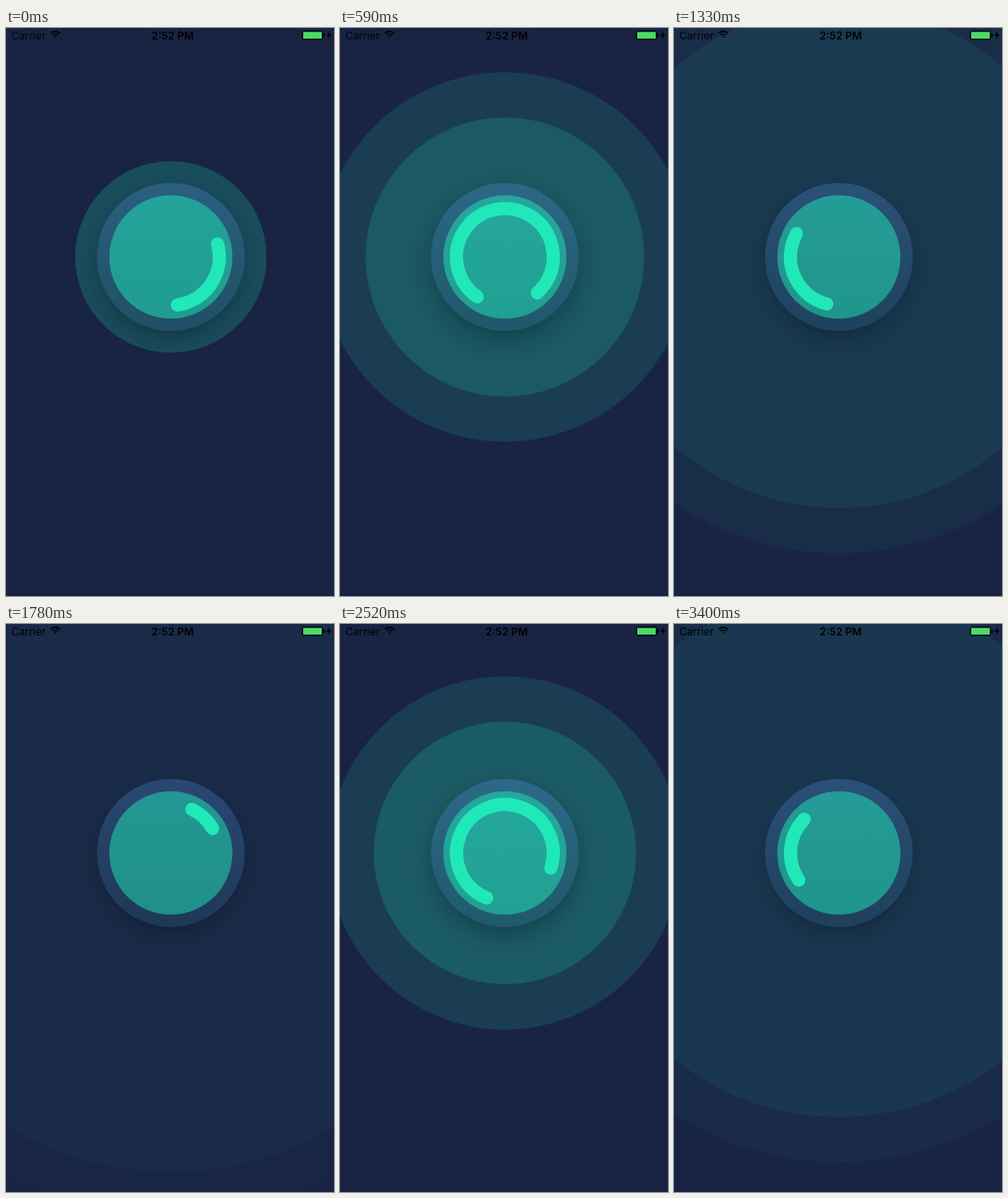
Animation of 373 by 645 pixels, one loop 3.5 s. Source, as an HTML page with a canvas:

```html
<!DOCTYPE html>
<html lang="en">
<head>
<meta charset="utf-8">
<title>Pulsing button</title>
<style>
  html, body { margin: 0; width: 100%; height: 100%; overflow: hidden; background: #192444; }
  canvas { display: block; }
</style>
</head>
<body>
<canvas id="stage" width="373" height="645"></canvas>
<script>
const ctx = document.getElementById('stage').getContext('2d');
const CX = 187.5, CY = 260, KNOB = 84, DISC = 70;
const MINT = '33,232,184';
const LOOP = 3500, CYCLE = 1984, SPIN_START = -312;
const WAVE_START = SPIN_START + 167, WAVE_LIFE = 2000, WAVE_DELAY = 300;
// The picture is held between these moments (ms).
const STEPS = [0, 140, 290, 440, 590, 740, 890, 1030, 1180, 1330, 1480, 1630, 1780,
  1930, 2080, 2220, 2370, 2520, 2670, 2820, 2960, 3110, 3260, 3400];

function circle(r, fill, y = CY) {
  ctx.beginPath();
  ctx.arc(CX, y, r, 0, 2 * Math.PI);
  ctx.fillStyle = fill;
  ctx.fill();
}

function gradient(g, stops) {
  for (const [at, color] of stops) g.addColorStop(at, color);
  return g;
}

const shadow = gradient(ctx.createRadialGradient(CX, CY + 10, 74, CX, CY + 10, 108), [
  [0, 'rgba(0,10,25,.25)'], [.3, 'rgba(0,10,25,.13)'], [.62, 'rgba(0,10,25,.05)'], [1, 'rgba(0,10,25,0)']
]);
const rim = gradient(ctx.createLinearGradient(0, CY - KNOB, 0, CY + KNOB), [
  [0, 'rgba(82,138,213,.3)'], [1, 'rgba(42,85,120,.3)']
]);

function drawWave(age) {
  if (age < 0 || age > WAVE_LIFE) return;
  const alpha = .225 * (1 - age / WAVE_LIFE) ** 1.3;
  circle(KNOB + .1712 * age, `rgba(${MINT},${alpha})`);
}

function drawKnob() {
  ctx.beginPath();
  ctx.arc(CX, CY + 10, 108, 0, 2 * Math.PI);
  ctx.moveTo(CX + KNOB, CY);
  ctx.arc(CX, CY, KNOB, 0, 2 * Math.PI);
  ctx.fillStyle = shadow;
  ctx.fill('evenodd');
  circle(KNOB, rim);
  circle(DISC, `rgba(${MINT},.5)`);
}

// Head leads for the first half of the cycle, tail catches up in the second.
function drawSpinner(t) {
  const phase = (t - SPIN_START) % CYCLE, half = 978;
  const angle = mid => {
    const deg = phase < half
      ? mid * phase / half
      : mid + (720 - mid) * (phase - half) / (CYCLE - half);
    return (deg - 90) * Math.PI / 180;
  };
  ctx.beginPath();
  ctx.arc(CX, CY, 55, angle(233), angle(540));
  ctx.strokeStyle = `rgb(${MINT})`;
  ctx.lineWidth = 15;
  ctx.lineCap = 'round';
  ctx.stroke();
}

function drawStatusBar() {
  ctx.fillStyle = ctx.strokeStyle = '#000';
  ctx.font = '12px Inter, sans-serif';
  ctx.textAlign = 'left';
  ctx.fillText('Carrier', 6, 12.5);
  ctx.font = '600 12px Inter, sans-serif';
  ctx.textAlign = 'center';
  ctx.fillText('2:52 PM', 189.5, 12.5);

  ctx.lineCap = 'butt';
  ctx.lineWidth = 1.7;
  for (const r of [1.2, 4.3, 7.4]) {
    ctx.beginPath();
    ctx.arc(56.3, 11.3, r, -Math.PI * .75, -Math.PI * .25);
    ctx.stroke();
  }

  ctx.lineWidth = 1;
  ctx.beginPath();
  ctx.roundRect(337, 3.5, 23, 9.5, 2);
  ctx.stroke();
  ctx.fillRect(361, 6.5, 1.5, 3.5);
  ctx.fillStyle = '#4cd964';
  ctx.fillRect(338, 4.5, 21, 7.5);

  ctx.fillStyle = '#000';
  ctx.beginPath();
  for (const [x, y] of [[368, 3], [364.5, 9], [367, 9], [366, 13], [370, 7], [367.5, 7]]) ctx.lineTo(x, y);
  ctx.fill();
}

function draw(now) {
  const clock = now % LOOP;
  const t = STEPS.findLast(step => step <= clock);
  ctx.fillStyle = '#192444';
  ctx.fillRect(0, 0, 373, 645);
  for (const start of [WAVE_START, WAVE_START + CYCLE]) {
    drawWave(t - start);
    drawWave(t - start - WAVE_DELAY);
  }
  drawKnob();
  drawSpinner(t);
  drawStatusBar();
}

const begin = performance.now();
function tick() {
  draw(performance.now() - begin);
  requestAnimationFrame(tick);
}
tick();
</script>
</body>
</html>
```
